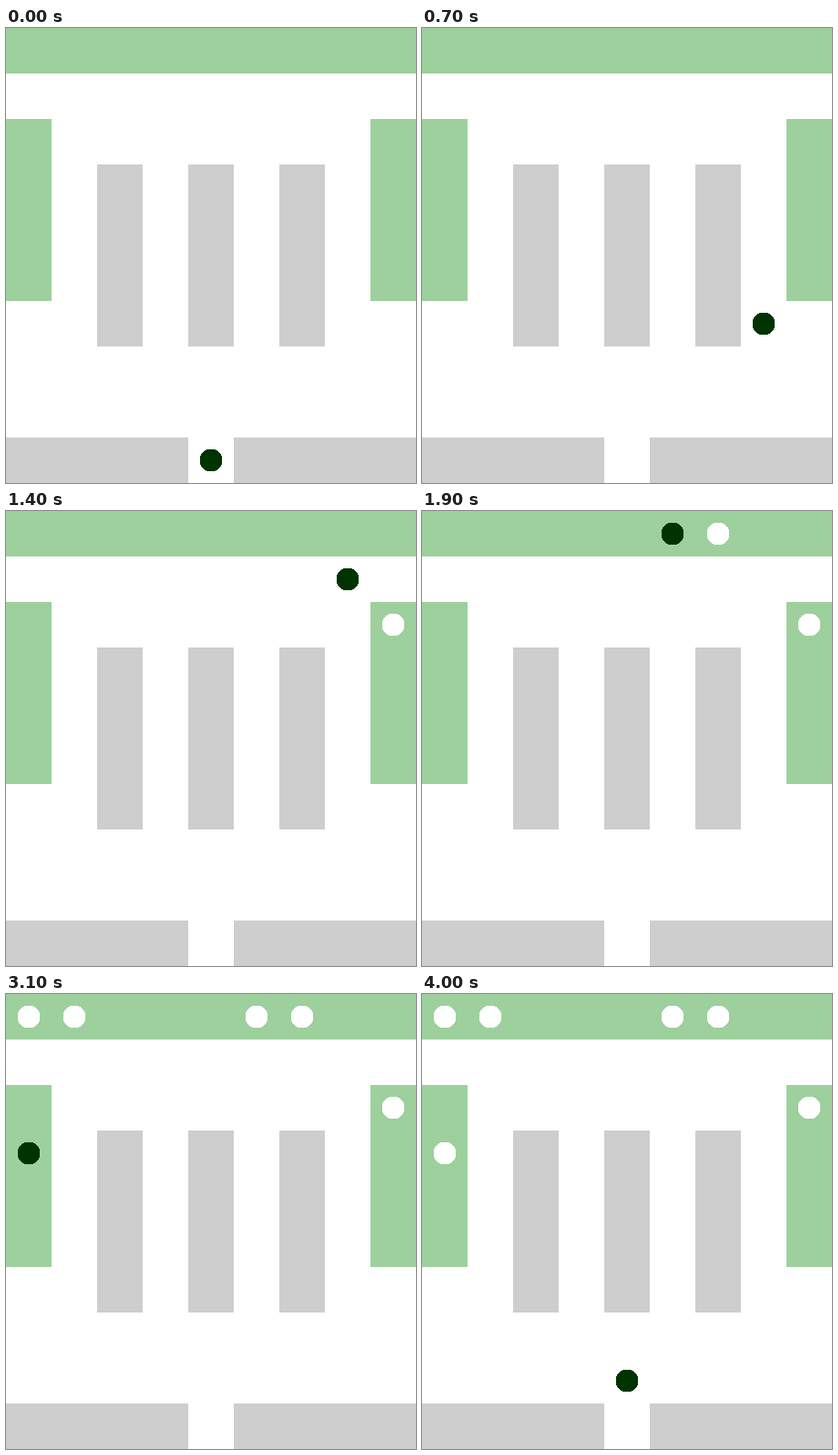
An HTML page with a canvas that plays this animation: 450 px wide and 500 px high, repeating every 4.1 s.

```html
<!DOCTYPE html>
<html lang="en">
<head>
<meta charset="utf-8">
<title>Warehouse robot</title>
<style>
  html, body { margin: 0; width: 100%; height: 100%; overflow: hidden; background: #fff; }
  canvas { display: block; }
</style>
</head>
<body>
<canvas id="stage" width="450" height="500"></canvas>
<script>
const ctx = document.getElementById('stage').getContext('2d');
const CELL = 50, STEP_MS = 100, LOOP_MS = 4100;
const GREEN = '#9dd09d', GRAY = '#cecece', ROBOT = '#003300', TRAIL = '#ffffff';

// Blocks on the grid: column, row, columns, rows
const shelves = [[0, 0, 9, 1], [0, 2, 1, 4], [8, 2, 1, 4]];
const walls = [[2, 3, 1, 4], [4, 3, 1, 4], [6, 3, 1, 4], [0, 9, 4, 1], [5, 9, 4, 1]];

const moves = { U: [0, -1], D: [0, 1], L: [-1, 0], R: [1, 0] };
const route = 'UURRRU UUUURL ULUDLU DLLLLU LDRDDL RDDDDD RRR'.replace(/ /g, '');
const path = [[4, 9]];
for (const key of route) {
  const [col, row] = path[path.length - 1];
  const [dx, dy] = moves[key];
  path.push([col + dx, row + dy]);
}

function fillBlocks(blocks, color) {
  ctx.fillStyle = color;
  for (const block of blocks) ctx.fillRect(...block.map(n => n * CELL));
}

// Hard-edged disc, built from pixel rows
function disc([col, row], color) {
  const cx = (col + 0.5) * CELL, cy = (row + 0.5) * CELL, r = 12.5;
  ctx.fillStyle = color;
  for (let y = -12; y < 12; y++) {
    const half = Math.round(Math.sqrt(r * r - (y + 0.5) ** 2));
    ctx.fillRect(cx - half, cy + y, 2 * half, 1);
  }
}

function draw(time) {
  const step = Math.max(0, Math.floor(time / STEP_MS) - 1);
  ctx.fillStyle = '#fff';
  ctx.fillRect(0, 0, 450, 500);
  fillBlocks(shelves, GREEN);
  fillBlocks(walls, GRAY);
  path.slice(0, step).forEach(cell => disc(cell, TRAIL));
  disc(path[step], ROBOT);
}

let start = null;
function tick(now) {
  if (start === null) start = now;
  draw((now - start) % LOOP_MS);
  requestAnimationFrame(tick);
}
draw(0);
requestAnimationFrame(tick);
</script>
</body>
</html>
```
